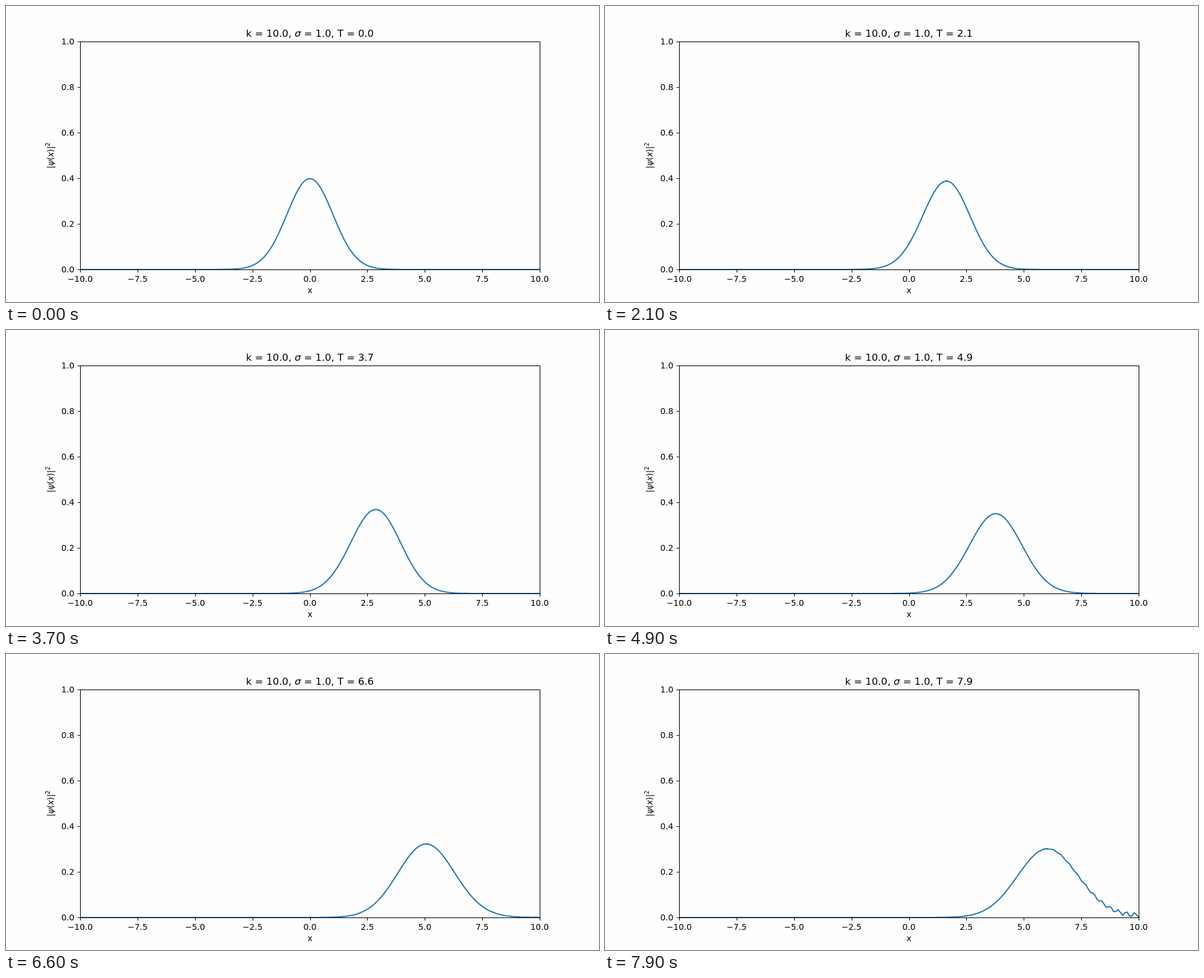
An HTML page for the animation above (8 s loop, 1000 px wide and 500 px high).

```html
<!DOCTYPE html>
<html lang="en">
<head>
<meta charset="utf-8">
<title>Wave packet</title>
<style>
  html, body { margin: 0; width: 100%; height: 100%; overflow: hidden; background: #fefefe; }
  svg { display: block; width: 100vw; height: 100vh; }
  text { font-family: "DejaVu Sans", sans-serif; font-size: 13.89px; fill: #000; white-space: pre; }
  .title { font-size: 16.667px; }
  .mid { text-anchor: middle; }
  .end { text-anchor: end; }
  .it { font-style: italic; }
  .axis { fill: none; stroke: #000; stroke-width: 1.11; }
  #curve { fill: none; stroke: #1f77b4; stroke-width: 2.083; stroke-linejoin: round; stroke-linecap: square; }
</style>
</head>
<body>
<svg viewBox="0 0 1000 500">
  <clipPath id="plot"><rect x="125" y="60" width="775" height="385"/></clipPath>
  <g clip-path="url(#plot)"><path id="curve"/></g>
  <path class="axis" id="ticks"/>
  <rect class="axis" x="125.5" y="60.5" width="775" height="385"/>
  <g id="labels"></g>
  <text class="mid" x="512.5" y="485">x</text>
  <text class="mid" transform="translate(80 252.5) rotate(-90)">|<tspan class="it">ψ</tspan>(<tspan class="it">x</tspan>)|<tspan dy="-5.6" font-size="9.72" style="font-size:9.72px">2</tspan></text>
  <text class="title mid" x="512.5" y="52">k = 10.0, <tspan class="it">σ</tspan> = 1.0, T = <tspan id="clock">0.0</tspan></text>
</svg>
<script>
const $ = id => document.getElementById(id);
const STEP = 100, STEPS = 80;
const N = 200, L = 20, H = L / N, DT = 0.1, K = 10;
const px = x => 125 + (x + 10) * 38.75;
const py = y => 445 - y * 385;

function addLabel(cls, x, y, value) {
  const el = document.createElementNS("http://www.w3.org/2000/svg", "text");
  el.setAttribute("class", cls);
  el.setAttribute("x", x);
  el.setAttribute("y", y);
  el.textContent = value.toFixed(1).replace("-", "\u2212");
  $("labels").append(el);
}

function drawAxes() {
  const snap = v => Math.floor(v + 0.5) + 0.5;
  let d = "";
  for (let i = 0; i <= 8; i++) {
    const v = -10 + 2.5 * i;
    d += `M${snap(px(v))} 445.5v4.86`;
    addLabel("mid", px(v), 466, v);
  }
  for (let i = 0; i <= 5; i++) {
    const v = i / 5;
    d += `M125.5 ${snap(py(v))}h-4.86`;
    addLabel("end", 115.3, py(v) + 5, v);
  }
  $("ticks").setAttribute("d", d);
}

// Sine modes of a box with hard walls; each Crank-Nicolson step turns mode n by a fixed angle.
const sine = Array.from({ length: 2 * N }, (_, i) => Math.sin(Math.PI * i / N));
const modes = [];
for (let n = 1; n < N; n++) {
  let re = 0, im = 0;
  for (let j = 1; j < N; j++) {
    const x = j * H - L / 2;
    const g = Math.pow(2 * Math.PI, -0.25) * Math.exp(-x * x / 4) * sine[n * j % (2 * N)] * 2 / N;
    re += g * Math.cos(K * x);
    im += g * Math.sin(K * x);
  }
  const energy = 2 * (1 - Math.cos(Math.PI * n / N)) / (H * H);
  modes.push({ n, re, im, turn: -2 * Math.atan(energy * DT / 2) });
}

function density(step) {
  const re = new Float64Array(N + 1), im = new Float64Array(N + 1);
  for (const m of modes) {
    const c = Math.cos(m.turn * step), s = Math.sin(m.turn * step);
    const a = m.re * c - m.im * s, b = m.re * s + m.im * c;
    for (let j = 1; j < N; j++) {
      const f = sine[m.n * j % (2 * N)];
      re[j] += a * f;
      im[j] += b * f;
    }
  }
  return Array.from(re, (r, j) => r * r + im[j] * im[j]);
}

let shown = -1;
function render(ms) {
  const step = Math.floor(ms / STEP) % STEPS;
  if (step !== shown) {
    shown = step;
    const points = density(step).map((p, j) => px(j * H - L / 2).toFixed(2) + " " + py(p).toFixed(2));
    $("curve").setAttribute("d", "M" + points.join("L"));
    $("clock").textContent = (step * DT).toFixed(1);
  }
}

drawAxes();
render(0);
const start = performance.now();
(function loop() {
  render(performance.now() - start);
  requestAnimationFrame(loop);
})();
</script>
</body>
</html>
```
